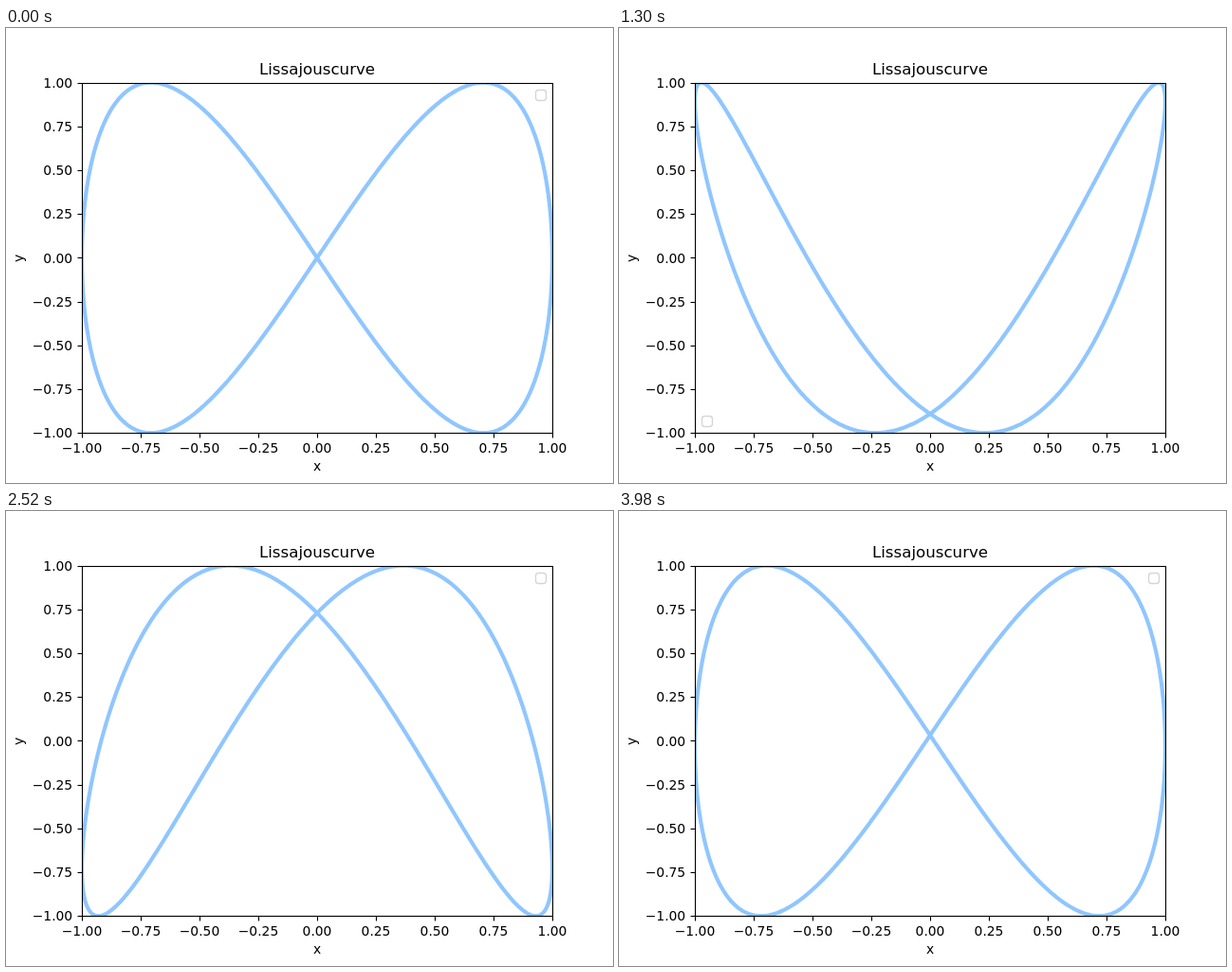
Write an HTML page with a canvas that moves like this. It is 640x480 px and loops after 4000 ms.

```html
<!DOCTYPE html>
<html lang="en">
<head>
<meta charset="utf-8">
<title>Lissajouscurve</title>
<style>
  html, body { margin: 0; width: 100%; height: 100%; overflow: hidden; background: #fff; }
  canvas { display: block; width: 640px; height: 480px; }
</style>
</head>
<body>
<canvas id="plot" width="640" height="480"></canvas>
<script>
const ctx = document.getElementById('plot').getContext('2d');
const LOOP = 4000, STEP = 20, STEPS = LOOP / STEP, POINTS = 1000;
const CX = 328, CY = 242.4, RX = 248, RY = 184.8;
const LEFT = 80.5, RIGHT = 576.5, TOP = 58.5, BOTTOM = 427.5;
const FONT = '"DejaVu Sans", sans-serif';

function line(x1, y1, x2, y2) {
  ctx.beginPath();
  ctx.moveTo(x1, y1);
  ctx.lineTo(x2, y2);
  ctx.stroke();
}

function text(str, x, y, size, align) {
  ctx.font = size + 'px ' + FONT;
  ctx.textAlign = align;
  ctx.fillText(str, x, y);
}

function curve(phase) {
  return Array.from({ length: POINTS }, (_, i) => {
    const a = 2 * Math.PI * i / POINTS;
    return [CX + RX * Math.sin(a), CY - RY * Math.sin(2 * a - phase)];
  });
}

function drawCurve(points) {
  ctx.save();
  ctx.beginPath();
  ctx.rect(80, 58, 497, 370);
  ctx.clip();
  ctx.beginPath();
  points.forEach(([x, y]) => ctx.lineTo(x, y));
  ctx.closePath();
  ctx.strokeStyle = '#90c6ff';
  ctx.lineWidth = 4.17;
  ctx.lineJoin = 'round';
  ctx.stroke();
  ctx.restore();
}

function drawAxes() {
  ctx.strokeStyle = ctx.fillStyle = '#000';
  ctx.lineWidth = 1.11;
  ctx.strokeRect(LEFT, TOP, RIGHT - LEFT, BOTTOM - TOP);
  for (let i = 0; i <= 8; i++) {
    const v = i / 4 - 1;
    const label = (v < 0 ? '\u2212' : '') + Math.abs(v).toFixed(2);
    const x = CX + RX * v, y = CY - RY * v;
    const tx = Math.round(x) + 0.5, ty = Math.round(y) + 0.5;
    line(tx, BOTTOM, tx, BOTTOM + 5);
    line(LEFT, ty, LEFT - 5, ty);
    text(label, x, 448, 13.89, 'center');
    text(label, 70.2, Math.round(y + 5.25), 13.89, 'right');
  }
  text('Lissajouscurve', CX, 49, 16.67, 'center');
  text('x', CX, 467, 13.89, 'center');
  ctx.save();
  ctx.translate(18, 243);
  ctx.rotate(-Math.PI / 2);
  text('y', 0, 0, 13.89, 'center');
  ctx.restore();
}

// The empty legend sits top right unless the curve runs through that spot.
function drawLegend(points) {
  const blocked = points.some(([x, y]) =>
    x > 557.95 && x < 569.06 && y > 64.54 && y < 75.66);
  const x = blocked ? 87.5 : 558.5, y = blocked ? 409.5 : 65.5;
  const s = 11, r = 3;
  ctx.beginPath();
  ctx.moveTo(x + r, y);
  ctx.lineTo(x + s - r, y);
  ctx.quadraticCurveTo(x + s, y, x + s, y + r);
  ctx.lineTo(x + s, y + s - r);
  ctx.quadraticCurveTo(x + s, y + s, x + s - r, y + s);
  ctx.lineTo(x + r, y + s);
  ctx.quadraticCurveTo(x, y + s, x, y + s - r);
  ctx.lineTo(x, y + r);
  ctx.quadraticCurveTo(x, y, x + r, y);
  ctx.closePath();
  ctx.fillStyle = 'rgba(255,255,255,0.8)';
  ctx.strokeStyle = 'rgba(204,204,204,0.8)';
  ctx.lineWidth = 1.39;
  ctx.fill();
  ctx.stroke();
}

function draw(ms) {
  const step = Math.floor((ms % LOOP) / STEP);
  const points = curve(2 * Math.PI * step / STEPS);
  ctx.fillStyle = '#fff';
  ctx.fillRect(0, 0, 640, 480);
  drawCurve(points);
  drawAxes();
  drawLegend(points);
}

let start = null;
function tick(now) {
  if (start === null) start = now;
  draw(Math.max(0, now - start));
  requestAnimationFrame(tick);
}
draw(0);
requestAnimationFrame(tick);
</script>
</body>
</html>
```
